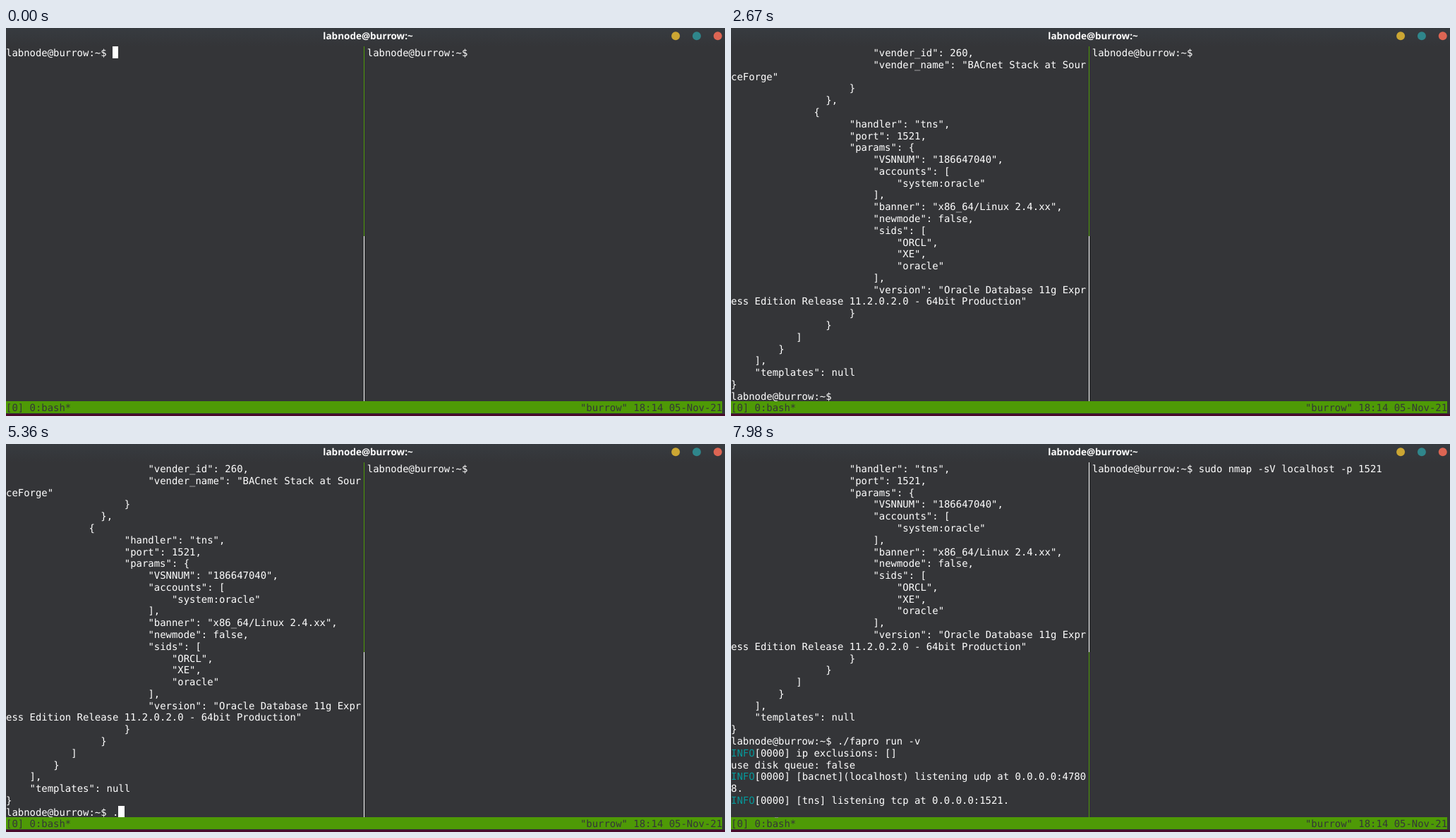
Animation, 1019 px wide and 550 px high, one loop 8 s. Source, as an HTML page:

```html
<!DOCTYPE html>
<html lang="en">
<head>
<meta charset="utf-8">
<title>Terminal</title>
<style>
  html, body { margin: 0; width: 100%; height: 100%; overflow: hidden; background: #343538; }
  svg { display: block; width: 100%; height: 100%; }
  rect { shape-rendering: crispEdges; }
  text { font: 14.95px "DejaVu Sans Mono", "Noto Sans Mono", monospace; text-rendering: geometricPrecision; white-space: pre; }
  .title { font: bold 14.5px "Noto Sans", "Open Sans", sans-serif; text-anchor: middle; }
</style>
</head>
<body>
<svg viewBox="0 0 1093 590" preserveAspectRatio="none">
  <defs>
    <linearGradient id="bar" x1="0" y1="0" x2="0" y2="1">
      <stop offset="0" stop-color="#373b40"/>
      <stop offset="1" stop-color="#343538"/>
    </linearGradient>
  </defs>
  <rect width="1093" height="590" fill="#343538"/>
  <rect width="1093" height="28" fill="url(#bar)"/>
  <text class="title" x="550.3" y="17" fill="#fff">labnode@burrow:~</text>
  <circle cx="1018" cy="12" r="6.4" fill="#cba633"/>
  <circle cx="1050" cy="12" r="6.4" fill="#2f868b"/>
  <circle cx="1082" cy="12" r="6.4" fill="#dc6553"/>
  <rect y="587" width="1093" height="3" fill="#4a0a2a"/>
  <g id="screen"></g>
</svg>
<script>
const LOOP = 8000, CELL = 9, ROW = 18, TOP = 28, ROWS = 30, BASE = 15;
const BG = '#343538', FG = '#fff', GREEN = '#4e9a06', YELLOW = '#c4a000', CYAN = '#06989a';
const PROMPT = 'labnode@burrow:~$ ';
const RIGHT = 61;

const config = `{
    "version": "0.40",
    "hostname": "",
    "network": "127.0.0.1/32",
    "network_build": "localhost",
    "geo_db": "",
    "exclusions": null,
    "storage": null,
    "use_logq": false,
    "syn_dev": "",
    "icmp_dev": "",
    "udp_dev": "",
    "cert_name": "",
    "hosts": [
        {
            "ip": "0.0.0.0",
            "handlers": [
                {
                    "handler": "bacnet",
                    "port": 47808,
                    "params": {
                        "description": "For bacnet stack",
                        "device_id": 1234,
                        "firmware_ver": "0.9.1",
                        "location": "SE2-315",
                        "model_name": "Bacnet Device",
                        "object_name": "Bacnet Device",
                        "software_ver": "1.0",
                        "vender_id": 260,
                        "vender_name": "BACnet Stack at Sour
ceForge"
                    }
                },
              {
                    "handler": "tns",
                    "port": 1521,
                    "params": {
                        "VSNNUM": "186647040",
                        "accounts": [
                            "system:oracle"
                        ],
                        "banner": "x86_64/Linux 2.4.xx",
                        "newmode": false,
                        "sids": [
                            "ORCL",
                            "XE",
                            "oracle"
                        ],
                        "version": "Oracle Database 11g Expr
ess Edition Release 11.2.0.2.0 - 64bit Production"
                    }
                }
           ]
        }
    ],
    "templates": null
}`.split('\n');

const output = `INFO[0000] ip exclusions: []
use disk queue: false
INFO[0000] [bacnet](localhost) listening udp at 0.0.0.0:4780
8.
INFO[0000] [tns] listening tcp at 0.0.0.0:1521.`.split('\n');

// Each step changes part of the state at a given time.
const steps = [];
const at = (time, change) => steps.push([time, change]);

function type(before, added, start, end) {
  const gap = added.length > 1 ? (end - start) / (added.length - 1) : 0;
  [...added].forEach((_, i) => {
    const cmd = before + added.slice(0, i + 1);
    at(start + gap * i, { cmd, col: PROMPT.length + cmd.length });
  });
}

at(0, { top: null, cmd: '', cursor: true, col: 18, row: 0, name: 'bash', badge: '', mark: '', right: '', side: 'left', trace: false });
at(320, { cursor: false });
at(730, { cursor: true });
type('', 'cat fapro', 820, 1610);
type('cat fapro', '.', 1750);
type('cat fapro.', 'json', 1890, 2160);
at(2260, { top: 28, cmd: '', col: 18, row: 29 });
at(2670, { cursor: false });
at(2720, { cursor: true });
at(3130, { name: '[tmux]', badge: '[0/188]' });
at(3400, { top: 0, badge: '[28/188]', col: 59, mark: '$' });
at(3760, { cursor: false });
at(4170, { top: 28, badge: '[0/188]', col: 18, mark: '', cursor: true });
at(4350, { name: 'bash', badge: '' });
at(4760, { cursor: false });
at(5170, { cursor: true });
type('', './fa', 5280, 5550);
type('./fa', 'pro', 5820, 6000);
type('./fapro', ' ', 6100);
type('./fapro ', 'run -v', 6240, 6700);
at(6800, { top: 29, col: 0, trace: true });
at(6850, { top: 34 });
at(7350, { name: './fapro' });
at(7620, { name: 'bash', side: 'right', col: RIGHT + 18, row: 0 });
at(7980, { right: 'sudo nmap -sV localhost -p 1521', cursor: false });

const screen = document.getElementById('screen');

function add(tag, attrs, content = '') {
  const el = document.createElementNS('http://www.w3.org/2000/svg', tag);
  for (const key in attrs) el.setAttribute(key, attrs[key]);
  el.textContent = content;
  screen.append(el);
}

const box = (x, y, width, height, fill) => add('rect', { x, y, width, height, fill });
const cells = (col, row, count, fill) => box(col * CELL, TOP + row * ROW, count * CELL, ROW, fill);

function print(str, col, row, fill = FG) {
  const body = str.trimStart();
  const x = (col + str.length - body.length) * CELL;
  add('text', { x, y: TOP + row * ROW + BASE, fill }, body);
}

function printLine(line, row) {
  const tag = line.startsWith('INFO') ? 4 : 0;
  if (tag) print('INFO', 0, row, CYAN);
  print(line.slice(tag), tag, row);
}

function draw(s) {
  screen.replaceChildren();

  // The green half of the divider points at the active pane.
  const half = 16 * ROW;
  const leftActive = s.side === 'left';
  box(544, TOP, 1, half, leftActive ? GREEN : FG);
  box(544, TOP + half, 1, ROWS * ROW - half, leftActive ? FG : GREEN);

  const prompt = PROMPT + s.cmd;
  const log = s.top === null ? [prompt] : [...config, prompt, ...(s.top === 34 ? output : [])];
  log.slice(s.top || 0, (s.top || 0) + ROWS).forEach((line, row) => {
    printLine(s.mark && row === s.row ? line.slice(0, s.col) : line, row);
  });
  print(PROMPT + s.right, RIGHT, 0);

  if (s.badge) {
    const col = 60 - s.badge.length;
    cells(col, 0, s.badge.length, YELLOW);
    print(s.badge, col, 0, BG);
  }

  cells(0, ROWS, 121, GREEN);
  print(`[0] 0:${s.name}*`, 0, ROWS, BG);
  const info = '"burrow" 18:14 05-Nov-21';
  print(info, 121 - info.length, ROWS, BG);
  if (s.trace) box(67, 567.5, 5, 1, '#85907a');

  if (s.cursor) cells(s.col, s.row, 1, FG);
  if (s.mark) print(s.mark, s.col, s.row, s.cursor ? BG : FG);
}

const start = performance.now();
let shown = -1;

function tick() {
  const time = (performance.now() - start) % LOOP;
  const count = steps.filter(([t]) => t <= time).length;
  if (count !== shown) {
    shown = count;
    draw(Object.assign({}, ...steps.slice(0, count).map(([, change]) => change)));
  }
  requestAnimationFrame(tick);
}
tick();
</script>
</body>
</html>
```
